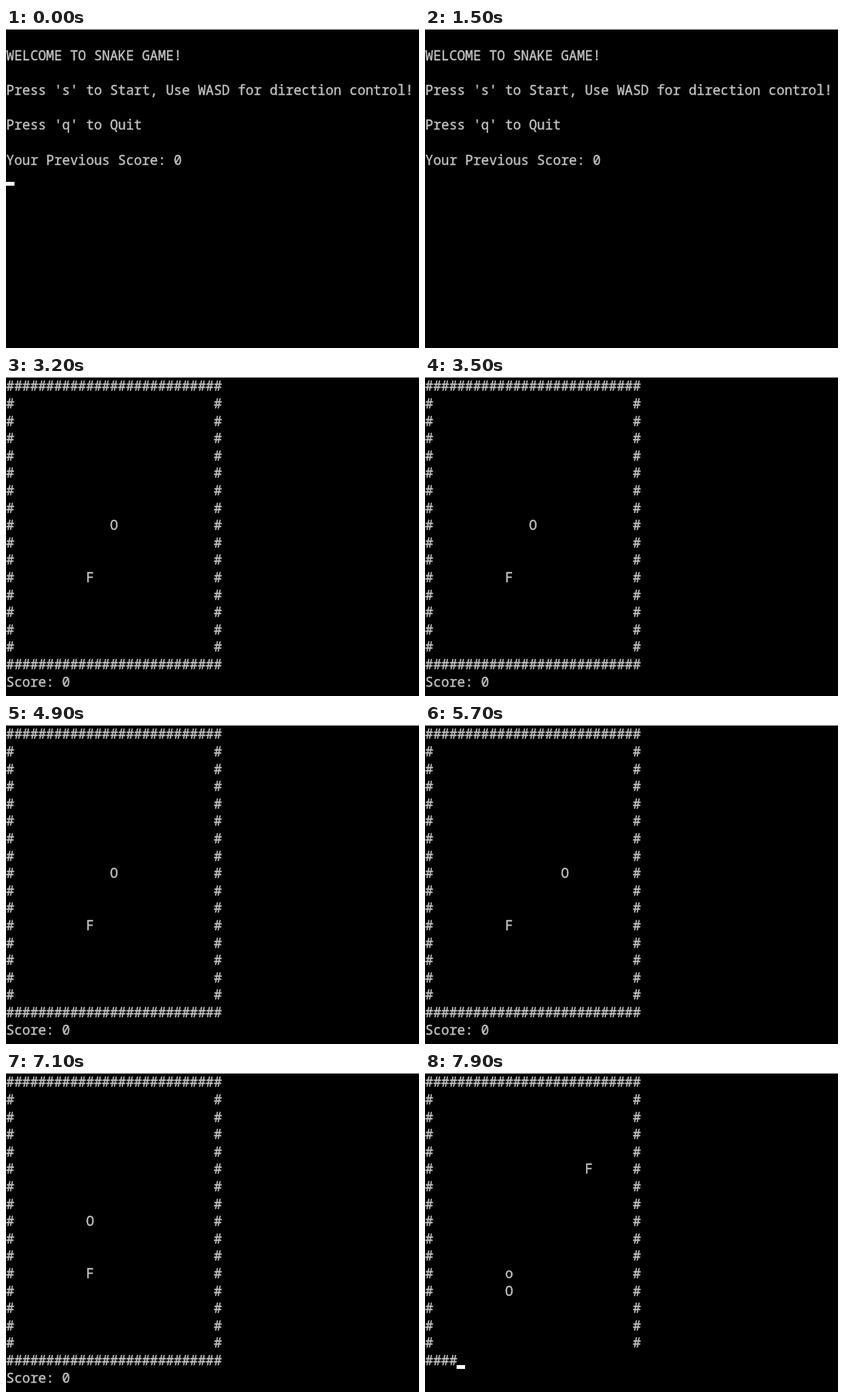
Write an HTML page with a canvas that moves like this. It is 536x416 px and loops after 8000 ms.

```html
<!DOCTYPE html>
<html lang="en">
<head>
<meta charset="utf-8">
<title>Snake in a console</title>
<style>
  html, body { margin: 0; width: 536px; height: 416px; overflow: hidden; background: #000; }
  canvas { display: block; }
</style>
</head>
<body>
<canvas id="screen" width="536" height="416"></canvas>
<script>
const ctx = document.getElementById('screen').getContext('2d');
const LOOP = 8000;
const CELL_W = 10.36, ROW_H = 22.6, LEFT = 0.3, BASE = 19.4;
const COLS = 27, ROWS = 17;
const TYPED = 2600, START = 3100, STEP = 200;
const FIRST_MOVE = 5050, EAT = 7650, LAST_DRAW = 7850;
const PATH = 'RRRRLLLLLLLDDDD';
const DIRS = { R: [1, 0], L: [-1, 0], D: [0, 1] };
const MENU = [
  '',
  'WELCOME TO SNAKE GAME!',
  '',
  "Press 's' to Start, Use WASD for direction control!",
  '',
  "Press 'q' to Quit",
  '',
  'Your Previous Score: 0'
];

const baseline = row => Math.round(BASE + row * ROW_H);

function print(text, row) {
  [...text].forEach((ch, col) => {
    if (ch === ' ') return;
    const x = LEFT + col * CELL_W, y = baseline(row);
    ctx.fillText(ch, x, y);
    ctx.strokeText(ch, x, y);
  });
}

function cursor(col, row) {
  ctx.fillStyle = '#fff';
  ctx.fillRect(Math.round(col * CELL_W), baseline(row), 11, 5);
}

function drawMenu(t) {
  MENU.forEach(print);
  const typed = t >= TYPED ? 's' : '';
  print(typed, MENU.length);
  if ((t + 300) % 1060 < 530) cursor(typed.length, MENU.length);
}

function snakeAt(moves) {
  let x = 13, y = 8, tail = null;
  for (const key of PATH.slice(0, moves)) {
    tail = [x, y];
    x += DIRS[key][0];
    y += DIRS[key][1];
  }
  return { head: [x, y], tail };
}

function drawGame(t) {
  const wall = '#'.repeat(COLS);
  const side = '#' + ' '.repeat(COLS - 2) + '#';
  const grid = Array.from({ length: ROWS }, (_, r) => [...(r % (ROWS - 1) ? side : wall)]);
  const put = ([x, y], ch) => { grid[y][x] = ch; };

  const moves = Math.max(0, Math.floor((t - FIRST_MOVE) / STEP) + 1);
  const { head, tail } = snakeAt(moves);
  const eaten = t >= EAT;
  put(eaten ? [20, 5] : [10, 11], 'F');
  if (eaten) put(tail, 'o');
  put(head, 'O');

  const lines = grid.map(row => row.join(''));
  if (t >= LAST_DRAW) {
    // The last screen is still being printed.
    lines[ROWS - 1] = '####';
    lines.forEach(print);
    cursor(4, ROWS - 1);
  } else {
    lines.push('Score: 0');
    lines.forEach(print);
  }
}

function draw(t) {
  ctx.fillStyle = '#000';
  ctx.fillRect(0, 0, 536, 416);
  ctx.fillStyle = '#f4f4f4';
  ctx.fillRect(0, 0, 536, 2);
  ctx.font = '17.27px "Noto Sans Mono", "DejaVu Sans Mono", monospace';
  ctx.fillStyle = ctx.strokeStyle = '#c4c4c4';
  ctx.lineWidth = 0.35;
  ctx.lineJoin = 'round';
  (t < START ? drawMenu : drawGame)(t);
}

const begin = performance.now();
function tick() {
  draw((performance.now() - begin) % LOOP);
  requestAnimationFrame(tick);
}
tick();
</script>
</body>
</html>
```
